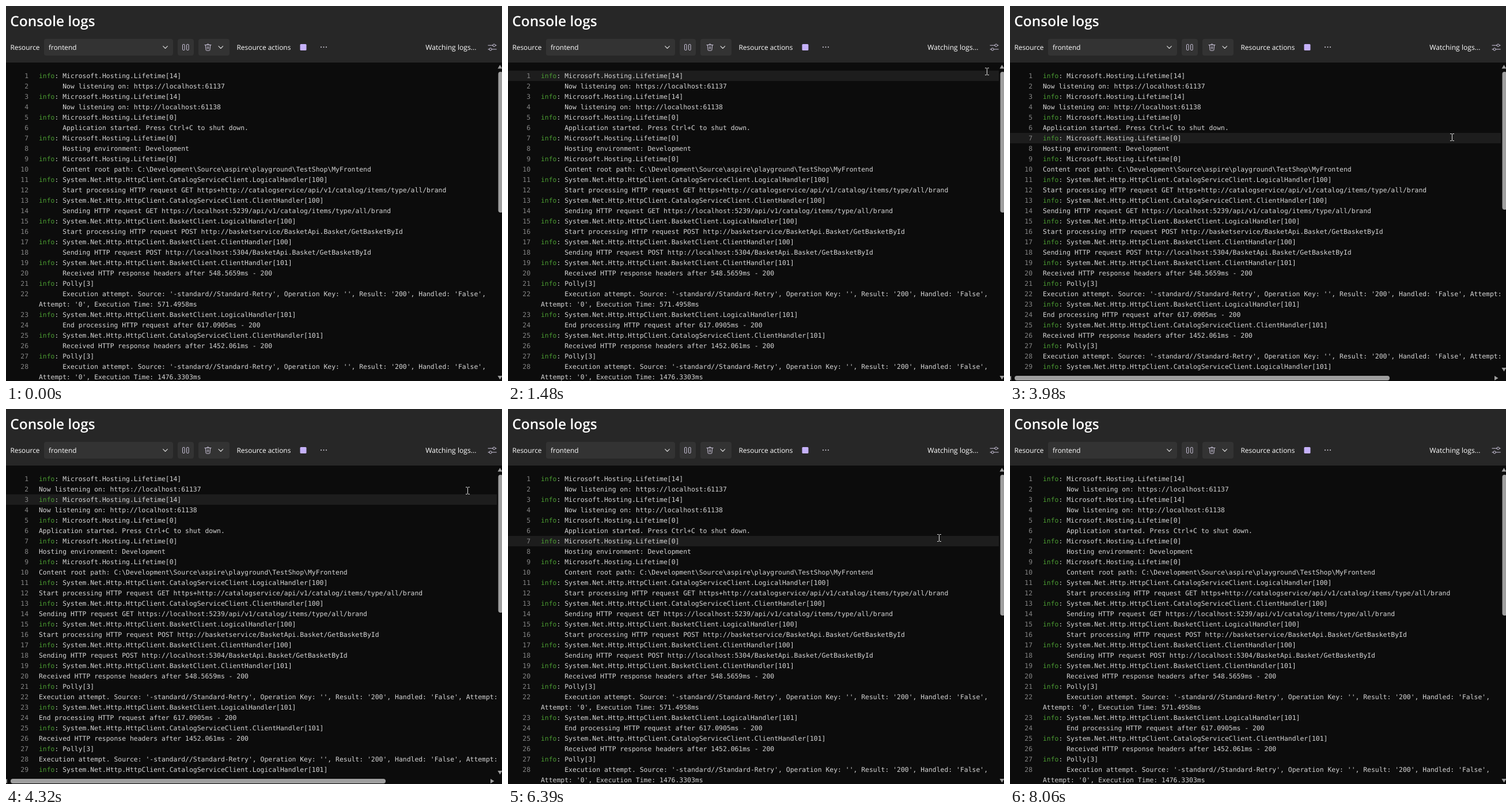
Recreate the animation shown at these times as an HTML page with a canvas. Size 861 px wide and 650 px high, loop 8730 ms.

```html
<!DOCTYPE html>
<html lang="en">
<head>
<meta charset="utf-8">
<title>Console logs</title>
<style>
html, body { margin: 0; width: 100%; height: 100%; overflow: hidden; background: #0c0c0c; }
canvas { display: block; width: 861px; height: 650px; }
</style>
</head>
<body>
<canvas id="stage"></canvas>
<script>
const W = 861, H = 650, LOOP = 8730, STEP = 68.4;
const canvas = document.getElementById('stage');
const ctx = canvas.getContext('2d');
const dpr = window.devicePixelRatio || 1;
canvas.width = W * dpr;
canvas.height = H * dpr;

const SANS = '"Open Sans", "Noto Sans", sans-serif';
const UI = '11.9px ' + SANS, UI_LARGE = '12.15px ' + SANS, TITLE = '600 24.5px ' + SANS;
const MONO = '11.41px "DejaVu Sans Mono", "Noto Sans Mono", monospace';
const CHAR = 6.87, ROW = 18, TOP = 112, COLS = 115;
const ICON = '#cbc4da';

// Odd rows are log categories, even rows are their messages.
const life = n => `Microsoft.Hosting.Lifetime[${n}]`;
const client = (name, part, n) => `System.Net.Http.HttpClient.${name}Client.${part}Handler[${n}]`;
const attempt = ms => "Execution attempt. Source: '-standard//Standard-Retry', Operation Key: '', " +
  `Result: '200', Handled: 'False', Attempt: '0', Execution Time: ${ms}ms`;
const logs = [
  life(14), 'Now listening on: https://localhost:61137',
  life(14), 'Now listening on: http://localhost:61138',
  life(0), 'Application started. Press Ctrl+C to shut down.',
  life(0), 'Hosting environment: Development',
  life(0), 'Content root path: C:\\Development\\Source\\aspire\\playground\\TestShop\\MyFrontend',
  client('CatalogService', 'Logical', 100),
  'Start processing HTTP request GET https+http://catalogservice/api/v1/catalog/items/type/all/brand',
  client('CatalogService', 'Client', 100),
  'Sending HTTP request GET https://localhost:5239/api/v1/catalog/items/type/all/brand',
  client('Basket', 'Logical', 100),
  'Start processing HTTP request POST http://basketservice/BasketApi.Basket/GetBasketById',
  client('Basket', 'Client', 100),
  'Sending HTTP request POST http://localhost:5304/BasketApi.Basket/GetBasketById',
  client('Basket', 'Client', 101), 'Received HTTP response headers after 548.5659ms - 200',
  'Polly[3]', attempt('571.4958'),
  client('Basket', 'Logical', 101), 'End processing HTTP request after 617.0905ms - 200',
  client('CatalogService', 'Client', 101), 'Received HTTP response headers after 1452.061ms - 200',
  'Polly[3]', attempt('1476.3303'),
  client('CatalogService', 'Logical', 101)
];

function layout(wrapped) {
  let y = TOP;
  return logs.map((text, i) => {
    const info = i % 2 === 0;
    const indent = info || wrapped ? 6 : 0;
    let lines = [text];
    if (wrapped && text.length + indent > COLS) {
      const cut = text.lastIndexOf(' ', COLS - indent);
      lines = [text.slice(0, cut), text.slice(cut + 1)];
    }
    const row = { n: i + 1, info, indent, lines, y, h: lines.length * ROW };
    y += row.h;
    return row;
  });
}
const wrappedRows = layout(true), flatRows = layout(false);

// Pointer moves: start, end, from, to, easing for x and y.
const easeOut = n => p => 1 - Math.pow(1 - p, n);
const easeIn = n => p => Math.pow(p, n);
const smooth = p => p * p * (3 - 2 * p);
const move = (t0, t1, from, to, ex, ey = ex) => ({ t0, t1, from, to, ex, ey });
const jump = (t, x, y) => move(t, t + 1, [x, y], [x, y], smooth);
const moves = [
  move(660, 1480, [779, 650], [831, 114], easeOut(2.58)),
  move(1540, 1820, [831, 114], [846, 83], easeOut(1.5)),
  move(2360, 2970, [846, 83], [767, 228], smooth),
  jump(3250, 766, 227),
  jump(3980, 767, 228),
  move(4120, 4940, [767, 228], [845, 72], easeOut(2), easeOut(2.78)),
  move(5350, 5910, [845, 72], [752, 224], smooth),
  jump(6260, 748, 224),
  move(7510, 8060, [748, 224], [712, 662], easeIn(1.6))
];
const clicks = [1960, 3110, 5080, 5980];
const between = (t, a, b) => t >= a && t < b;

function pointer(t, lag = 0) {
  if (!between(t, 660, 8060)) return null;
  const m = moves.filter(v => v.t0 <= t).pop();
  const stepped = Math.floor((t - m.t0 + 8) / STEP) * STEP;
  const p = Math.max(0, Math.min(1, (stepped - lag) / (m.t1 - m.t0)));
  const mix = (i, ease) => m.from[i] + (m.to[i] - m.from[i]) * ease(p);
  return { x: mix(0, m.ex), y: mix(1, m.ey) };
}

function rect(x, y, w, h, color, r = 0) {
  ctx.fillStyle = color;
  ctx.beginPath();
  ctx.roundRect(x, y, w, h, r);
  ctx.fill();
}
function text(s, x, y, color, font = UI, align = 'left') {
  ctx.font = font;
  ctx.textRendering = 'geometricPrecision';
  ctx.textAlign = align;
  ctx.fillStyle = color;
  ctx.fillText(s, x, y);
}
function line(d, color, x = 0, y = 0, width = 1) {
  ctx.save();
  ctx.translate(x, y);
  ctx.strokeStyle = color;
  ctx.lineWidth = width;
  ctx.lineCap = ctx.lineJoin = 'round';
  ctx.stroke(new Path2D(d));
  ctx.restore();
}
function solid(d, color, x = 0, y = 0) {
  ctx.save();
  ctx.translate(x, y);
  ctx.fillStyle = color;
  ctx.fill(new Path2D(d));
  ctx.restore();
}
function dot(x, y, r, color) {
  ctx.fillStyle = color;
  ctx.beginPath();
  ctx.arc(x, y, r, 0, Math.PI * 2);
  ctx.fill();
}
const chevron = (x, y) => line('M-3.8-1.8L0 2L3.8-1.8', '#dcdcdc', x, y, 1.1);

function header(hot) {
  rect(0, 0, W, 98, '#272727');
  text('Console logs', 7.2, 34.5, '#fff', TITLE);
  text('Resource', 7.4, 76, '#fff');
  rect(66, 57, 224, 29, '#333', 4);
  text('frontend', 74, 76, '#fff');
  chevron(276.5, 71.5);
  rect(298, 57, 28, 29, '#333', 4);
  rect(334, 57, 54, 29, '#333', 4);
  line('M306.5 67.5a1 1 0 0 1 1-1h1.6a1 1 0 0 1 1 1v8a1 1 0 0 1-1 1h-1.6a1 1 0 0 1-1-1z' +
    'M313.5 67.5a1 1 0 0 1 1-1h1.6a1 1 0 0 1 1 1v8a1 1 0 0 1-1 1h-1.6a1 1 0 0 1-1-1z', ICON);
  line('M-5.5-4H5.5M-1.8-4a1.8 1.8 0 0 1 3.6 0M-4.3-4L-3.4 4.6a1.2 1.2 0 0 0 1.2 1.1H2.2' +
    'a1.2 1.2 0 0 0 1.2-1.1L4.3-4M-1.2-1.2V2.8M1.2-1.2V2.8', ICON, 350.5, 71.5);
  chevron(372.8, 71.5);
  text('Resource actions', 400.5, 76, '#fff');
  rect(510.5, 66, 11, 11, '#c5b1fa', 1.5);
  for (const x of [547, 551.5, 556]) dot(x, 71.3, 1, '#d8d4e0');
  text('Watching logs...', 728.3, 76, '#fff', UI_LARGE);
  if (hot) rect(831, 57, 27, 29, '#363636', 4);
  line('M837 68.2H845M849.4 68.2H851.3M837 75H838.8M843.2 75H851.3', ICON);
  line('M845 68.2a2.2 2.2 0 1 0 4.4 0a2.2 2.2 0 1 0-4.4 0M838.8 75a2.2 2.2 0 1 0 4.4 0a2.2 2.2 0 1 0-4.4 0', ICON);
}

function consoleView(wrapped, hoverY) {
  const bottom = wrapped ? H : 637;
  ctx.save();
  ctx.beginPath();
  ctx.rect(0, 98, 852, bottom - 98);
  ctx.clip();
  for (const row of wrapped ? wrappedRows : flatRows) {
    if (hoverY >= row.y && hoverY < row.y + row.h) rect(0, row.y, 852, row.h, '#1d1d1d');
    const base = row.y + 13;
    text(row.n, 39, base, '#858585', MONO, 'right');
    if (row.info) {
      text('info', 57, base, '#4b9c32', MONO);
      text(':', 57 + 4 * CHAR, base, '#ccc', MONO);
    }
    row.lines.forEach((s, i) =>
      text(s, 57 + (i ? 0 : row.indent * CHAR), base + i * ROW, '#d6d6d6', MONO));
  }
  ctx.restore();

  const bar = '#9f9f9f';
  solid('M0-3.5L4 3H-4z', bar, 857.5, 105.5);
  rect(854.5, 114, 8, wrapped ? 244 : 239, bar, 4);
  solid('M0 3.5L4-3H-4z', bar, 857.5, wrapped ? 644 : 630);
  if (!wrapped) {
    solid('M-3.5 0L3-4V4z', bar, -1, 645);
    rect(8, 641, 651, 8, bar, 4);
    solid('M3.5 0L-3-4V4z', bar, 844, 645);
  }
}

const menuIcons = [
  'M0-5V3M-3.2 0L0 3.2L3.2 0M-4.5 5.5H4.5',
  'M-5 1C-3.5-4 3.5-4 5 1M-1.9 1.2a1.9 1.9 0 1 0 3.8 0a1.9 1.9 0 1 0-3.8 0',
  'M-.5 5H-3.5A2 2 0 0 1-5.5 3V-3.5A2 2 0 0 1-3.5-5.5H3A2 2 0 0 1 5-3.5V-.5M-5.5-2.5H5',
  'M-3.5-5H3.5A1.5 1.5 0 0 1 5-3.5V3.5A1.5 1.5 0 0 1 3.5 5H-3.5A1.5 1.5 0 0 1-5 3.5V-3.5A1.5 1.5 0 0 1-3.5-5M-2.3 0L-.6 1.8L2.5-1.7',
  'M-6-4H-4M-1-4H6M-6 0H-1M2.5 0H4A2 2 0 0 1 4 4H3M-6 4H-1M-5.5-6L5.5 6'
];
function menu(wrapped, p) {
  ctx.save();
  ctx.shadowColor = 'rgba(0,0,0,.45)';
  ctx.shadowBlur = 8 * dpr;
  ctx.shadowOffsetY = 2 * dpr;
  rect(661.5, 85.5, 196, 159.5, '#383838', 5);
  ctx.restore();
  rect(661.5, 121.5, 196, 1, '#4a4a4a');
  const items = ['Download logs', 'Show hidden resources', 'Show timestamps', 'UTC timestamps',
    wrapped ? "Don't wrap log lines" : 'Wrap log lines'];
  [104, 141, 170, 199, 228].forEach((y, i) => {
    const off = i === 1 || i === 3;
    if (!off && Math.abs(p.y - y) < 14.5) rect(666, y - 14.5, 189, 29, '#424242', 4);
    line(menuIcons[i], off ? '#747474' : '#dcd6e8', 681, y);
    if (i === 2) {
      dot(684, y + 3, 3.6, '#dcd6e8');
      line('M0-1.8V.3H1.5', '#373737', 684, y + 3);
    }
    text(items[i], 695, y + 4, off ? '#7c7c7c' : '#fff', UI_LARGE);
  });
}

const hand = 'M-1.3 4Q0 2 1.3 4V8.2Q2.5 7.4 3.4 8.4Q4.7 7.8 5.3 9Q6.8 8.5 6.8 10.2V12.2Q6.5 14 5.5 15.2V16.3H-.8' +
  'V15.2Q-2.7 13 -4 10.7Q-3.9 9 -2.4 9.9L-1.3 11z';
const arrow = 'M0 0V13.2L3 10.4L5 15L7 14.1L5 9.7H9.2z';
const beam = 'M-3-6H-1L0-5L1-6H3M0-5V5M-3 6H-1L0 5L1 6H3';
function cursor(p, kind) {
  if (kind === 'beam') return line(beam, '#e4e4e4', Math.round(p.x) + .5, Math.round(p.y) - .5);
  const shape = kind === 'hand' ? hand : arrow;
  line(shape, '#111', p.x, p.y, 1.6);
  solid(shape, '#fff', p.x, p.y);
}

function draw(t) {
  const p = pointer(t), late = pointer(t, 24);
  const wrapped = !between(t, 3180, 6325);
  const open = between(t, 2030, 3180) || between(t, 5215, 6325);
  const onButton = p && p.x > 831 && p.y > 57 && p.y < 86;
  const inMenu = open || between(t, 3180, 3250) || between(t, 6325, 6390);

  ctx.setTransform(dpr, 0, 0, dpr, 0, 0);
  rect(0, 0, W, H, '#0c0c0c');
  consoleView(wrapped, p && !inMenu && p.y >= 98 ? late.y : -1);
  header(onButton);
  if (!p) return;
  if (open) menu(wrapped, p);

  const click = clicks.find(c => between(t, c, c + 140));
  if (click) {
    ctx.globalAlpha = t < click + 70 ? .8 : .4;
    dot(p.x + .5, p.y + .5, 10.5, '#cdb91a');
    ctx.globalAlpha = 1;
  }
  cursor(p, onButton || inMenu ? 'hand' : p.y < 98 ? 'arrow' : 'beam');
}

const start = performance.now();
function tick() {
  draw((performance.now() - start) % LOOP);
  requestAnimationFrame(tick);
}
tick();
</script>
</body>
</html>
```
